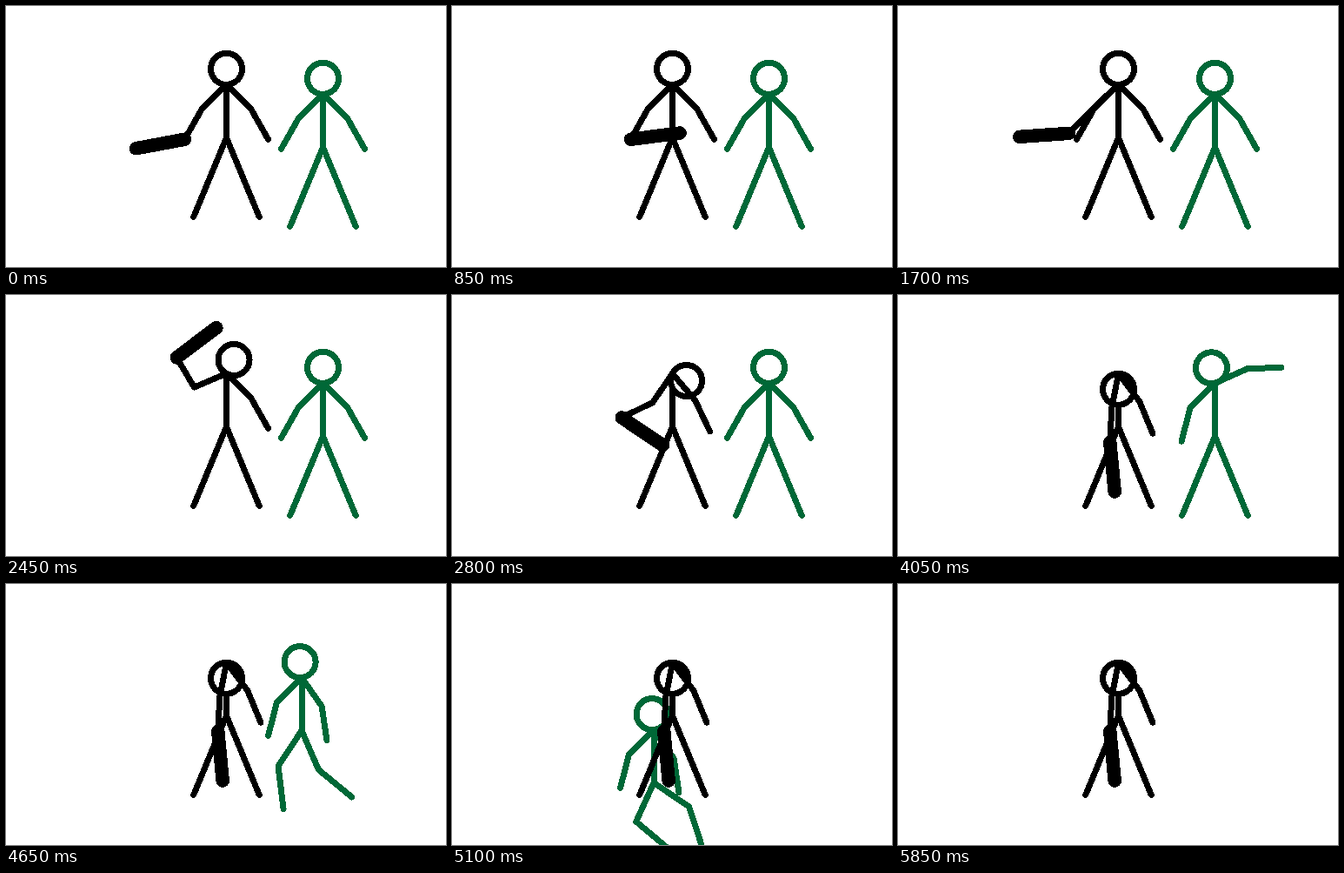
Write an HTML page that moves like this. It is 506 by 300 pixels and loops after 5.9 s.

```html
<!DOCTYPE html>
<html lang="en">
<head>
<meta charset="utf-8">
<title>Stick figures</title>
<style>
  html, body { margin: 0; width: 100%; height: 100%; overflow: hidden; background: #fff; }
  svg { display: block; shape-rendering: crispEdges; }
  path { fill: none; stroke-width: 7; stroke-linecap: round; stroke-linejoin: round; }
  circle { fill: #fff; stroke-width: 7; }
  .bat { stroke-width: 15.5; }
</style>
</head>
<body>
<svg id="stage" width="506" height="300" viewBox="0 0 506 300"></svg>
<script>
const LOOP = 5900, STEP = 50;
const UPPER = 40.3, LOWER = 39.6, SPINE = 61, THIGH = 49, SHIN = 49.5, NECK = 18, BAT = 57;
const stage = document.getElementById('stage');

// Angles in degrees, clockwise from pointing right.
const LEFT_ARM = [135, 119.5];
const STAND = [112.5, 112.5, 67.5, 67.5]; // left thigh and shin, right thigh and shin
const WALK = [123.4, 83, 66.6, 39.4];
const RUN = [114.4, 40, 34, 72];
const PASS = [-20, 0, 45, 10];
const KICK = [34, 100, 20, -15];

// Progress from 0 to 1 between two times.
const ramp = (t, from, to) => Math.min(1, Math.max(0, (t - from) / (to - from)));
const easeOut = u => u * (2 - u);
const swing = u => Math.sin(Math.PI * u);
const mix = (a, b, u) => a.map((v, i) => v + (b[i] - v) * u);
const add = (a, b, u) => a.map((v, i) => v + b[i] * u);

function reach([x, y], length, deg) {
  const r = deg * Math.PI / 180;
  return [x + length * Math.cos(r), y + length * Math.sin(r)];
}

function make(tag, parent, attrs = {}) {
  const el = document.createElementNS('http://www.w3.org/2000/svg', tag);
  for (const name in attrs) el.setAttribute(name, attrs[name]);
  return parent.appendChild(el);
}

const trace = (path, points) =>
  path.setAttribute('d', 'M' + points.map(p => p.map(v => v.toFixed(2))).join('L'));

// Poses a two-part limb and returns its end.
function bend(path, start, [a, b], lenA, lenB) {
  const joint = reach(start, lenA, a), end = reach(joint, lenB, b);
  trace(path, [start, joint, end]);
  return end;
}

function makeFigure(color) {
  const group = make('g', stage, { stroke: color });
  const [spine, legL, legR] = [1, 2, 3].map(() => make('path', group));
  const head = make('circle', group, { r: NECK });
  const [armL, armR] = [1, 2].map(() => make('path', group));

  function pose(neck, tilt, left, right, legs) {
    const hip = reach(neck, SPINE, 90);
    const [cx, cy] = reach(neck, NECK, tilt - 90);
    trace(spine, [neck, hip]);
    bend(legL, hip, legs.slice(0, 2), THIGH, SHIN);
    bend(legR, hip, legs.slice(2), THIGH, SHIN);
    head.setAttribute('cx', cx);
    head.setAttribute('cy', cy);
    bend(armR, neck, right, UPPER, LOWER);
    return bend(armL, neck, left, UPPER, LOWER);
  }
  return { group, pose };
}

const green = makeFigure('#006837');
const black = makeFigure('#000');
const spareArm = make('path', black.group);
const bat = make('path', black.group, { class: 'bat' });

function moveBlack(t) {
  const neck = [253.5, 90.3];
  const lift = ramp(t, 1700, 2250), hit = ramp(t, 2400, 2450), fall = ramp(t, 2450, 3050);
  const upper = 135 + 22 * ramp(t, 1650, 2250) - 56 * fall;
  const fore = 119.5 + 14.5 * ramp(t, 1650, 1700) + 123 * lift - 17.5 * hit - 146.5 * fall;
  const batAngle = 169.4 + 366.6 * ramp(t, 0, 1700) + 94 * easeOut(lift)
    + 80 * ramp(t, 2250, 2400) - 27 * hit + 121.5 * fall;
  const hand = black.pose(neck, 28.5 * hit + 151.5 * fall, [upper, fore],
    [45 + 8 * fall, 60.5 + 7 * fall], STAND);
  trace(bat, [hand, reach(hand, BAT, batAngle)]);
  bend(spareArm, neck, LEFT_ARM, UPPER, LOWER);
  spareArm.style.display = t < 1750 ? '' : 'none';
}

function moveGreen(t) {
  const start = ramp(t, 3200, 3350), raise = ramp(t, 3200, 3600), lower = ramp(t, 4150, 4650);
  const wave = swing(4 * ramp(t, 3350, 4150));
  const step = ramp(t, 4400, 4650), run = ramp(t, 4650, 5100);
  const turn = ramp(t, 5100, 5600), leave = ramp(t, 5100, 5850);
  const neck = [
    364.5 - 24.5 * step - 108 * run - 10 * swing(turn),
    101.3 + 6.2 * step + 60 * run + 90 * leave + 84 * leave ** 3
  ];
  const right = [
    45 - 69 * raise ** 2 + 79 * lower,
    60.5 - 108 * raise - 45 * wave + 129 * lower
  ];
  let legs = mix(mix(STAND, WALK, step), RUN, run);
  legs = add(add(legs, PASS, swing(run)), KICK, swing(turn));
  const tilt = -27 * start + 21 * ramp(t, 3350, 4400);
  green.pose(neck, tilt, [135, 119.5 - 15 * start], right, legs);
}

const begin = performance.now();
function tick() {
  const t = Math.floor((performance.now() - begin) % LOOP / STEP) * STEP;
  moveGreen(t);
  moveBlack(t);
  requestAnimationFrame(tick);
}
tick();
</script>
</body>
</html>
```
